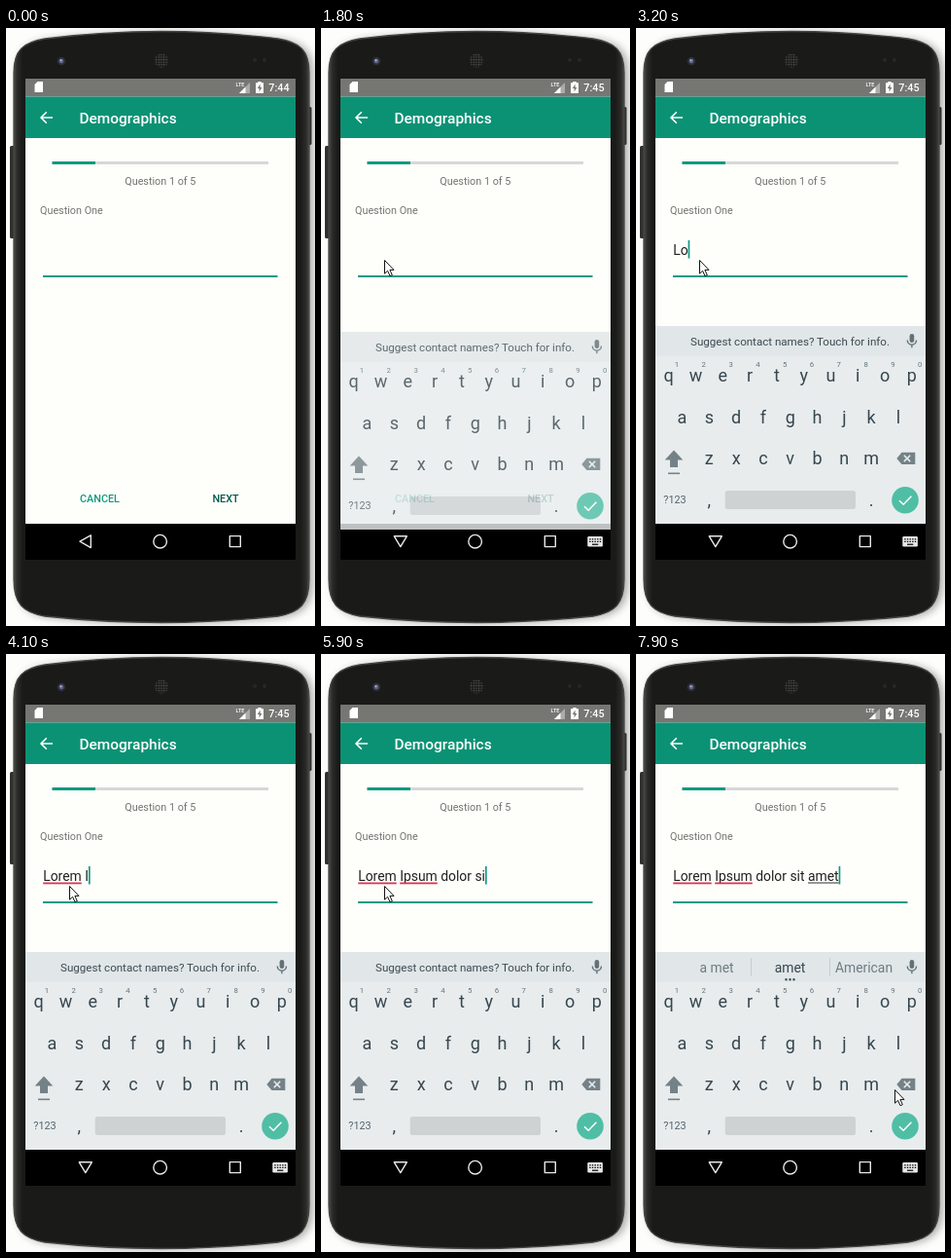
Recreate the animation shown at these times as an HTML page. Size 318 by 614 pixels, loop 8000 ms.

```html
<!DOCTYPE html>
<html lang="en">
<head>
<meta charset="utf-8">
<title>Demographics form</title>
<style>
html, body { margin: 0; width: 100%; height: 100%; overflow: hidden; background: #fdfdfb; }
svg { display: block; width: 318px; height: 614px; font-family: Roboto, sans-serif; }
.mid { text-anchor: middle; }
.small { font-size: 10.81px; }
.bold { font-weight: 500; }
.key { font-size: 18px; fill: #37474f; }
.digit { font-size: 7.8px; fill: #63757d; }
.word { font-size: 13.9px; fill: #6d7c83; }
</style>
</head>
<body>
<svg viewBox="0 0 318 614">
  <defs>
    <path id="shell" d="M8 46C8 23 17 15 40 11Q160 -4 280 11C303 15 312 23 312 46V566C312 591 303 600 280 604Q160 617 40 604C17 600 8 591 8 566Z"/>
    <linearGradient id="metal" x2="1" y2="0">
      <stop offset="0" stop-color="#4a4a48"/><stop offset=".012" stop-color="#2b2b29"/>
      <stop offset=".03" stop-color="#1a1b19"/><stop offset=".97" stop-color="#1a1b19"/>
      <stop offset=".99" stop-color="#2b2b29"/><stop offset="1" stop-color="#4a4a48"/>
    </linearGradient>
    <pattern id="mesh" width="2.6" height="2.6" patternUnits="userSpaceOnUse">
      <circle cx="1.3" cy="1.3" r=".75" fill="#5c5c5a"/>
    </pattern>
    <filter id="blur" x="-10%" width="120%"><feGaussianBlur stdDeviation="4"/></filter>
  </defs>

  <rect width="318" height="614" fill="#fdfdfb"/>
  <use href="#shell" x="4" y="1" fill="#777" opacity=".65" filter="url(#blur)"/>
  <rect x="4" y="121" width="5" height="95" rx="1.5" fill="#30302e"/>
  <rect x="310.5" y="81" width="4" height="39" rx="1.5" fill="#30302e"/>
  <use href="#shell" fill="url(#metal)"/>
  <use href="#shell" fill="none" stroke="#464644" stroke-width="1.3"/>
  <circle cx="57" cy="34" r="4.3" fill="#2c2e38"/>
  <circle cx="57" cy="34" r="2.4" fill="#5d6288"/>
  <circle cx="56.5" cy="33.3" r="1" fill="#b3b6d0"/>
  <circle cx="160" cy="33.5" r="7.2" fill="url(#mesh)"/>
  <circle cx="256" cy="33" r="2" fill="#272826"/>
  <circle cx="266" cy="33" r="2" fill="#272826"/>

  <rect x="20" y="52" width="278" height="494" fill="#fefefb"/>
  <rect x="20" y="52" width="278" height="18.5" fill="#767773"/>
  <rect x="20" y="70.5" width="278" height="42.5" fill="#0b9274"/>
  <g fill="#fff">
    <path d="M32.5 55H38V66H29.5V58Z"/>
    <text x="236.5" y="60.3" font-size="5.6" class="bold">LTE</text>
    <path d="M251 56V67H240Z" opacity=".4"/>
    <path d="M246.5 60.5V67H240Z"/>
    <path d="M259.3 55H262.7V56.2H265V67H257V56.2H259.3Z"/>
    <text id="clock" x="270.3" y="65.2" class="small bold"></text>
    <text x="75.5" y="97.8" font-size="15.44" class="bold">Demographics</text>
  </g>
  <path d="M261.6 57.6L258.8 62H260.6V65.6L263.4 61H261.6Z" fill="#767773"/>
  <path d="M48 92H36.3M41.8 86.2L36 92L41.8 97.8" fill="none" stroke="#fff" stroke-width="1.5"/>

  <rect x="47.5" y="137" width="222.5" height="3" fill="#d6d9d6"/>
  <rect x="47.5" y="137" width="44.5" height="3" fill="#109a80"/>
  <g class="small" fill="#73746f">
    <text x="158.8" y="160.6" class="mid">Question 1 of 5</text>
    <text x="35" y="190.6">Question One</text>
  </g>
  <rect x="38" y="254" width="241.5" height="2" fill="#109a84"/>
  <text id="input" x="38.2" y="232.8" font-size="13.9" fill="#20211f"></text>
  <g id="marks"></g>
  <rect id="caret" y="218" width="1.7" height="18.5" fill="#109a84"/>
  <text x="96.5" y="486.8" class="small bold mid" fill="#109a80">CANCEL</text>
  <text x="226" y="486.8" class="small bold mid" fill="#00584a">NEXT</text>

  <rect x="20" y="509" width="278" height="37" fill="#000"/>
  <g fill="none" stroke="#e8e8e8" stroke-width="1.4" stroke-linejoin="round">
    <path id="back"/>
    <circle cx="158.6" cy="527.2" r="6.8"/>
    <rect x="230.3" y="521.6" width="11" height="11"/>
  </g>
  <g id="switcher">
    <rect x="274.3" y="522" width="15.6" height="10.4" rx="1.2" fill="#e8e8e8"/>
    <path d="M276.2 524.8H288.2M276.2 527.3H288.2" stroke="#000" stroke-width="1.3" stroke-dasharray="1.4 1.25"/>
    <path d="M279 530.2H285.3" stroke="#000" stroke-width="1.2"/>
  </g>

  <g id="board">
    <rect x="20" y="306" width="278" height="203" fill="#e8eced"/>
    <rect x="20" y="306" width="278" height="30.5" fill="#e1e6e8"/>
    <text id="hint" x="158.5" y="326" font-size="11.58" class="mid" fill="#3b4a51">Suggest contact names? Touch for info.</text>
    <g id="bar">
      <path d="M118.5 312V331M199.5 312V331" stroke="#c8ced1"/>
      <text x="83" y="327" class="word mid"></text>
      <text x="158.5" y="327" class="word mid" style="fill:#37474f"></text>
      <text x="234.5" y="327" class="word mid"></text>
      <path d="M154.5 334.3h.01M158.5 334.3h.01M162.5 334.3h.01" stroke="#37474f" stroke-width="2.4" stroke-linecap="round"/>
    </g>
    <rect x="281.6" y="314" width="4.6" height="9" rx="2.3" fill="#637177"/>
    <path d="M279.3 320.5a4.6 4.6 0 0 0 9.2 0M283.9 325V328.3" fill="none" stroke="#637177" stroke-width="1.4"/>
    <g id="keys"></g>
    <path d="M39 433.5L48.3 443.5H43V451H35V443.5H29.7Z" fill="#748288"/>
    <path d="M33 457.3H45" stroke="#748288" stroke-width="1.6"/>
    <path d="M273.5 435.8H287.3V448H273.5L268.3 441.9Z" fill="#748288"/>
    <path d="M275.8 438.8l6.4 6.3m0 -6.3l-6.4 6.3" stroke="#e8eced" stroke-width="1.5"/>
    <text x="40" y="488.3" class="mid" font-size="10.8" fill="#52626a">?123</text>
    <rect x="91.7" y="475" width="134.3" height="19" rx="2.5" fill="#ced2d3"/>
    <circle cx="277" cy="484.7" r="13.8" fill="#4fbea5"/>
    <path d="M271 485.2L275.2 489.3L283.4 480.8" fill="none" stroke="#fff" stroke-width="1.5"/>
  </g>

  <path id="mouse" d="M.5 .5V14.2L3.6 11.3L6 16.7L8.3 15.7L5.9 10.4H10Z" fill="#fff" stroke="#111" stroke-width="1"/>
</svg>
<script>
const LOOP = 8000, LEFT = 38.2;
const TEXT = "Lorem Ipsum dolor sit amet";
const typedAt = [
  3100, 3200, 3300, 3500, 3800, 4000, 4100, 4300, 4400, 4600, 4700, 4900, 5000,
  5100, 5200, 5300, 5400, 5600, 5800, 5900, 6100, 6300, 6400, 6500, 6600, 6700];
const caretFlips = [400, 600, 800, 900, 1300, 1600, 2400, 3000, 3100, 3400, 3500, 7200, 7500];
// Suggestion bar; an empty entry shows the hint line
const bars = [
  [0, ""], [3800, "Lore|Lorem|Love"], [4000, ""], [4400, "Up|Ips|Is"],
  [4600, "Up|Ipsu|Is"], [4700, "Up|Ipsum|Is"], [5000, "do|d|did"], [5100, "so|do|don't"],
  [5200, "doll|dol|dolls"], [5300, "solo|dolo|dolor"], [5400, "color|dolor|dollar"],
  [5600, ""], [6500, "an|am|and"], [6600, "same|ame|name"], [6700, "met|amet|met a"],
  [7000, "a met|amet|American"]];

const $ = id => document.getElementById(id);
const pen = document.createElement("canvas").getContext("2d");
const width = s => { pen.font = "13.9px Roboto, sans-serif"; return pen.measureText(s).width; };
const count = (times, t) => times.filter(x => x <= t).length;
const show = (id, on) => $(id).setAttribute("visibility", on ? "inherit" : "hidden");
const words = $("bar").querySelectorAll("text");

function keyRow(letters, x, y) {
  return [...letters].map((c, i) =>
    `<text class="key mid" x="${x + 27.8 * i}" y="${y}">${c}</text>`).join("");
}
$("keys").innerHTML = keyRow("qwertyuiop", 33.7, 363) + keyRow("asdfghjkl", 47.5, 405.8) +
  keyRow("zxcvbnm", 75.3, 448) + keyRow(",", 75.3, 491) + keyRow(".", 242, 491) +
  [..."1234567890"].map((c, i) =>
    `<text class="digit mid" x="${42 + 27.8 * i}" y="348">${c}</text>`).join("");

function mark(from, to, color, h) {
  const x = LEFT + width(TEXT.slice(0, from));
  return `<rect x="${x}" y="234.5" width="${width(TEXT.slice(from, to))}" height="${h}" fill="${color}"/>`;
}

function mouseAt(t) {
  if (t < 900) return [21, 238];
  if (t < 1300) return [57, 238];
  const p = t < 7500 ? 0 : Math.min(1, (Math.floor((t - 7500) / 100) + 1) / 5);
  const e = p * p * (3 - 2 * p);
  return [65 + 201 * e, 238 + 209 * e];
}

function draw(t) {
  const n = count(typedAt, t), typed = TEXT.slice(0, n);
  const bar = bars.filter(b => b[0] <= t).pop()[1];
  $("clock").textContent = t < 800 ? "7:44" : "7:45";
  $("input").textContent = typed;
  $("caret").setAttribute("x", LEFT + width(typed));
  show("caret", count(caretFlips, t) % 2);

  let marks = "";
  if (n > 5) marks += mark(0, 5, "#dc3350", 1.8);
  if (n > 11) marks += mark(6, 11, "#dc3350", 1.8);
  if (bar && !typed.endsWith(" ")) marks += mark(typed.lastIndexOf(" ") + 1, n, "#30312f", 1);
  $("marks").innerHTML = marks;

  show("hint", !bar);
  show("bar", bar);
  bar.split("|").forEach((w, i) => words[i].textContent = w);

  const open = t >= 1600;
  $("back").setAttribute("d", open ? "M75.3 521.8H88.3L81.8 532.6Z" : "M87.3 520.8V533.6L76 527.2Z");
  show("switcher", open);
  show("board", t >= 1800);
  $("board").setAttribute("transform", `translate(0 ${t < 1900 ? 6 : t < 2000 ? 1.5 : 0})`);
  $("board").setAttribute("opacity", t < 1900 ? .82 : t < 2000 ? .95 : 1);

  show("mouse", t >= 800);
  $("mouse").setAttribute("transform", `translate(${mouseAt(t)})`);
}

const start = performance.now();
function tick() {
  draw((performance.now() - start) % LOOP);
  requestAnimationFrame(tick);
}
tick();
</script>
</body>
</html>
```
